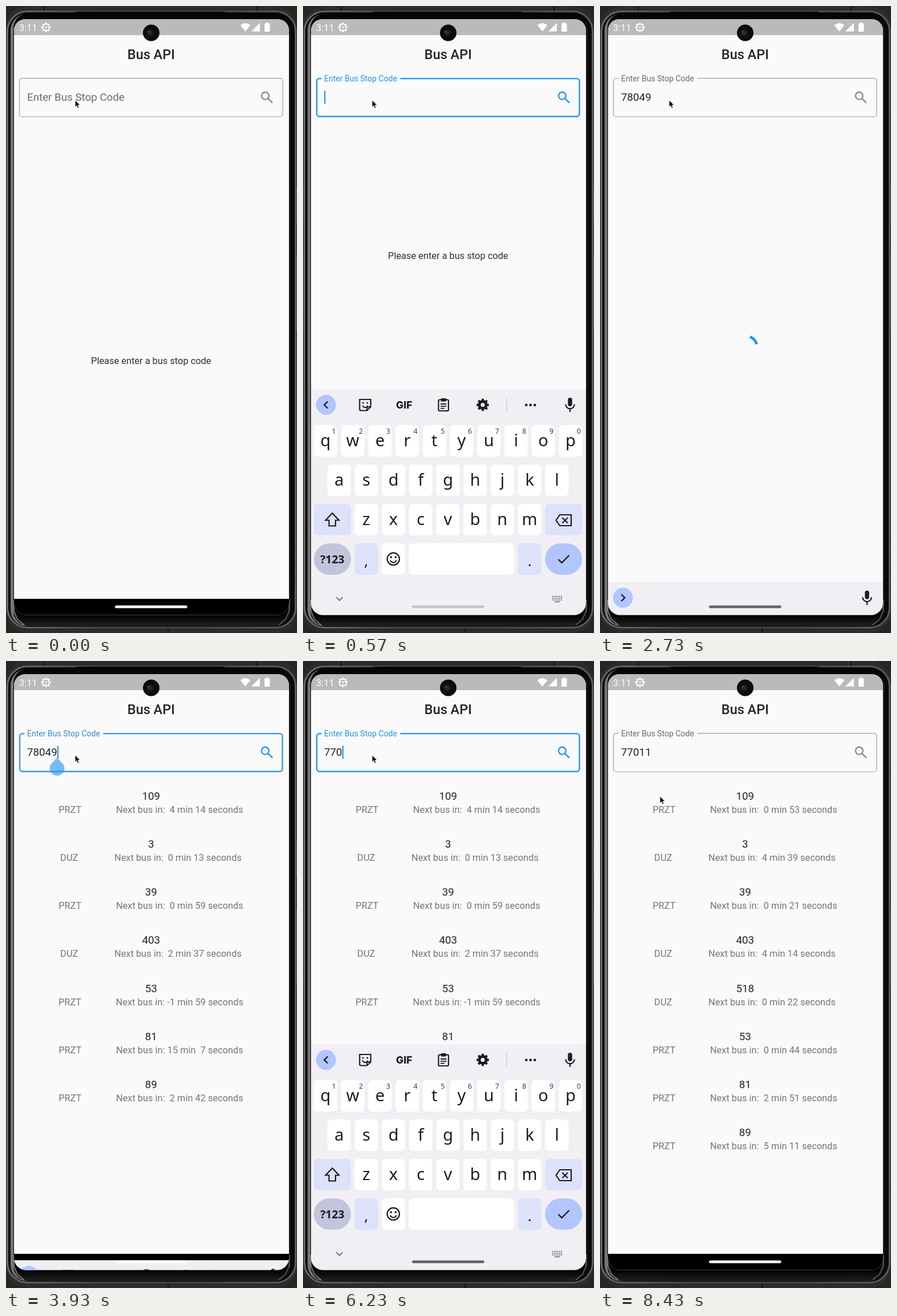
Animation of 510x1098 px, one loop 8.46 s. Source, as an HTML page with a canvas:

```html
<!DOCTYPE html>
<html lang="en">
<head>
<meta charset="utf-8">
<title>Bus API</title>
<style>
html, body { margin: 0; width: 100%; height: 100%; overflow: hidden; background: #1d1d1d; }
canvas { display: block; width: 510px; height: 1098px; }
</style>
</head>
<body>
<canvas id="stage"></canvas>
<script>
const W = 510, H = 1098, LOOP = 8460;
const BLUE = [33, 150, 243], INK = '#242424', GREY = '#757575', PAGE = '#fafafa';
const ACCENT = `rgb(${BLUE})`;
const UI = 'Roboto, sans-serif', KEYS = '"Noto Sans", sans-serif';
const KB_TOP = 671, KB_END = 1066, NAV = 1038.2;
const canvas = document.getElementById('stage');
const dpr = window.devicePixelRatio || 1;
canvas.width = W * dpr;
canvas.height = H * dpr;
const c = canvas.getContext('2d');

const FOCUS = [[270, 2600], [3870, 6730]];
const TYPED = [
  [0, ''], [670, '78'], [770, '780'], [1970, '7804'], [2300, '78049'],
  [4530, '7804'], [4630, '780'], [4900, '78'], [5030, '7'],
  [5870, '77'], [6230, '770'], [6400, '7701'], [6530, '77011']
];
const FIRST = [
  ['109', 'PRZT', 4, 14], ['3', 'DUZ', 0, 13], ['39', 'PRZT', 0, 59], ['403', 'DUZ', 2, 37],
  ['53', 'PRZT', -1, 59], ['81', 'PRZT', 15, 7], ['89', 'PRZT', 2, 42]
];
const SECOND = [
  ['109', 'PRZT', 0, 53], ['3', 'DUZ', 4, 39], ['39', 'PRZT', 0, 21], ['403', 'DUZ', 4, 14],
  ['518', 'DUZ', 0, 22], ['53', 'PRZT', 0, 44], ['81', 'PRZT', 2, 51], ['89', 'PRZT', 5, 11]
];
const MOUSE = [
  [7520, 121, 165], [7570, 140, 110], [7640, 225, 68], [7700, 296, 57],
  [7780, 225, 105], [7860, 85, 205], [7930, 105, 237]
];

const clamp = x => Math.max(0, Math.min(1, x));
const lerp = (a, b, k) => a + (b - a) * k;
const mix = (a, b, k) => `rgb(${a.map((v, i) => Math.round(lerp(v, b[i], k)))})`;

// cubic-bezier(.4, 0, .2, 1)
function ease(x) {
  x = clamp(x);
  let lo = 0, hi = 1, s = x;
  for (let i = 0; i < 18; i++) {
    s = (lo + hi) / 2;
    const r = 1 - s;
    if (1.2 * r * r * s + 0.6 * r * s * s + s * s * s < x) lo = s; else hi = s;
  }
  return s * s * (3 - 2 * s);
}

function text(str, x, y, size, color, align = 'left', weight = 400, family = UI) {
  c.font = `${weight} ${size}px ${family}`;
  c.textAlign = align;
  c.fillStyle = color;
  c.fillText(str, x, y);
}
function widthOf(str, size) {
  c.font = `400 ${size}px ${UI}`;
  return c.measureText(str).width;
}
function round(x, y, w, h, r, fill) {
  c.beginPath();
  c.roundRect(x, y, w, h, r);
  if (fill) { c.fillStyle = fill; c.fill(); }
}
function disc(x, y, r, fill) {
  c.beginPath();
  c.arc(x, y, r, 0, 7);
  c.fillStyle = fill;
  c.fill();
}
function ring(x, y, r, color, width) {
  c.beginPath();
  c.arc(x, y, r, 0, 7);
  stroke(color, width);
}
function stroke(color, width) {
  c.strokeStyle = color;
  c.lineWidth = width;
  c.stroke();
}
function trace(points) {
  c.beginPath();
  for (let i = 0; i < points.length; i += 2) c.lineTo(points[i], points[i + 1]);
}
function line(points, color, width) { trace(points); stroke(color, width); }
function poly(points, fill) { trace(points); c.closePath(); c.fillStyle = fill; c.fill(); }
function gradient(x0, y0, x1, y1, ...colors) {
  const g = c.createLinearGradient(x0, y0, x1, y1);
  colors.forEach((col, i) => g.addColorStop(i / (colors.length - 1), col));
  return g;
}
function gear(x, y, r, color) {
  for (let i = 0; i < 8; i++) {
    const a = i * Math.PI / 4;
    line([x + Math.cos(a) * r * .6, y + Math.sin(a) * r * .6,
      x + Math.cos(a) * r, y + Math.sin(a) * r], color, r * .36);
  }
}

function drawPhone() {
  c.fillStyle = '#262626';
  c.fillRect(0, 0, W, H);
  round(0, 0, W, H, 38, '#2c2c2c');
  round(2.5, 9.5, 505, 1079, 35, '#0a0a0a');
  stroke(gradient(0, 0, W, 0, '#6a6a6a', '#444', '#444', '#5c5c5c'), 3);
  line([67, 0, 67, 9], '#101010', 1.5);
  line([440, 0, 440, 9], '#101010', 1.5);
  line([284, 1090, 284, 1098], '#101010', 1.5);
  // the lit inner edge of the glass
  round(8, 14, 490, 1072, 28, gradient(8, 0, 498, 0, '#777', '#111', '#111', '#2c2c2c'));
  round(13, 13, 484, 1072, 26, '#050505');
  round(122, 10, 262, 4, 2, '#000');
  round(20, 1062, 470, 24, [0, 0, 20, 20], gradient(0, 1066, 0, 1086, '#000', '#202020'));
  line([13, 1040, 14, 1060, 20, 1074, 32, 1084], '#777', 2);
  line([497, 1040, 496, 1060, 490, 1074, 478, 1084], '#555', 2);
  c.fillStyle = '#555';
  c.fillRect(508, 316, 2, 64);
  c.fillRect(508, 436, 2, 132);
}

function drawStatus() {
  c.fillStyle = '#bababa';
  c.fillRect(14, 23, 482, 28);
  text('3:11', 23, 43.5, 16.4, '#fff');
  gear(70, 37.5, 8.3, '#fff');
  ring(70, 37.5, 6, '#fff', 1.7);
  line([70, 37.5, 70, 43], '#fff', 1.2);
  line([64.5, 36.5, 75.5, 36.5], '#fff', 1.2);
  c.beginPath();
  c.moveTo(419.5, 44.5);
  c.lineTo(410.5, 33.5);
  c.quadraticCurveTo(419.5, 26.5, 428.5, 33.5);
  c.closePath();
  c.fillStyle = '#fff';
  c.fill();
  poly([430, 44.5, 445, 44.5, 445, 29.5], '#fff');
  round(453, 30.5, 9.5, 14.5, 1.5, '#fff');
  c.fillRect(455.5, 29, 4.5, 2);
}

function drawCamera() {
  disc(254.5, 47, 14.5, '#0b0b0b');
  const g = c.createRadialGradient(252.5, 47, 1, 252.5, 47, 8);
  g.addColorStop(0, '#3f281c');
  g.addColorStop(1, '#0b0b0b');
  disc(252.5, 47, 8, g);
  disc(250, 45, 1.2, '#6b5348');
}

function drawField(t, s) {
  const float = ease((t - 270) / 200);
  const on = s.focus ? clamp((t - s.focus[0]) / 80) : 0;
  const thick = s.focus ? 2.34 : 1.17;
  const inset = s.focus ? 1.1 : .6;
  round(23 + inset, 126 + inset, 462.6 - 2 * inset, 68.6 - 2 * inset, 4.5);
  stroke(mix([155, 155, 155], BLUE, on), thick);
  c.fillStyle = PAGE;
  c.fillRect(32.5, 124, 138 * float, 6);
  text('Enter Bus Stop Code', 37, lerp(166.3, 131.5, float), lerp(18.75, 14.06, float),
    mix([108, 108, 108], BLUE, on));
  const tint = s.focus ? ACCENT : '#8c8c8c';
  ring(454.3, 157.2, 6.4, tint, 2.4);
  line([458.5, 161.4, 467, 169.6], tint, 2.6);

  text(s.value, 37, 166.3, 18.75, INK);
  const end = 37 + widthOf(s.value, 18.75);
  if (!s.focus) return;
  const since = t - Math.max(s.focus[0], s.typedAt);
  if (Math.floor(since / 500) % 2 === 0) {
    c.fillStyle = ACCENT;
    c.fillRect(end + .2, 148.5, 2.2, 22.5);
  }
  const grip = clamp((t - 3870) / 100) * clamp((4730 - t) / 100);
  if (grip > 0) {
    c.save();
    c.globalAlpha = grip;
    c.translate(end - .2, 188);
    c.rotate(Math.PI / 4);
    round(-12.9, -12.9, 25.8, 25.8, [0, 12.9, 12.9, 12.9], ACCENT);
    c.restore();
  }
}

function drawList(rows) {
  const pad = n => String(n).padStart(2);
  rows.forEach(([bus, operator, min, sec], i) => {
    const y = 242.5 + i * 84.25;
    const wait = `Next bus in: ${pad(min)} min ${pad(sec)} seconds`;
    const w1 = widthOf(operator, 16.4), w2 = widthOf(wait, 16.4);
    const gap = (445 - w1 - w2) / 3;
    text(bus, 254.3, y, 18.75, INK, 'center');
    text(operator, 31.5 + gap, y + 23.2, 16.4, GREY);
    text(wait, 31.5 + 2 * gap + w1, y + 23.2, 16.4, GREY);
  });
}

function drawSpinner(age, y) {
  const turn = Math.max(0, age - 30);
  const phase = (age + 20) / 1333 % 1;
  const head = ease(phase * 2) * 1.5 * Math.PI;
  const tail = ease(phase * 2 - 1) * 1.5 * Math.PI;
  const start = -Math.PI / 2 + tail + turn / 2222 * 2 * Math.PI + turn / 1333 * Math.PI / 2;
  c.beginPath();
  c.arc(254.5, y, 21.1, start, start + Math.max(head - tail, .001));
  stroke(ACCENT, 4.7);
}

function key(x, y, w, fill = '#fff', r = 7) { round(x, y, w, 55, r, fill); }

function drawToolbar(folded) {
  const ink = '#1c1b1f', y = 698.5;
  disc(40.3, y, 17.5, '#b1c5ff');
  const d = folded ? -1 : 1;
  line([40.3 + 3 * d, y - 6, 40.3 - 3 * d, y, 40.3 + 3 * d, y + 6], ink, 2.4);
  round(464.3, 686, 7.4, 15, 3.7, ink);
  c.beginPath();
  c.arc(468, 697.5, 7.7, 0, Math.PI);
  stroke(ink, 2.2);
  line([468, 705, 468, 711], ink, 2.3);
  if (folded) return;

  c.beginPath();
  c.moveTo(112, 708.5);
  c.lineTo(101.5, 708.5);
  c.arcTo(99.3, 708.5, 99.3, 706, 2.5);
  c.lineTo(99.3, 689);
  c.lineTo(118.7, 689);
  c.lineTo(118.7, 702);
  c.closePath();
  stroke(ink, 2.2);
  line([112, 708.5, 112, 702, 118.7, 702], ink, 2);
  disc(105.3, 695, 1.5, ink);
  disc(112.7, 695, 1.5, ink);
  c.beginPath();
  c.arc(109, 698, 5, .35, 2.8);
  stroke(ink, 2);

  text('GIF', 177.3, 705, 17.5, ink, 'center', 800, 'Inter, sans-serif');

  round(237.5, 689.5, 17.5, 19.5, 2);
  stroke(ink, 2.2);
  round(241.5, 687, 9.5, 5.5, 1.5, ink);
  for (let i = 0; i < 3; i++) line([241, 697 + i * 3.8, i < 2 ? 251.5 : 248, 697 + i * 3.8], ink, 1.8);

  gear(315, y, 10.8, ink);
  ring(315, y, 6, ink, 5);

  line([357, 686, 357, 711], '#cac9d0', 1.2);
  for (const x of [391.3, 398.8, 406.3]) disc(x, y + .2, 2.3, ink);
}

function drawKeyboard(top, folded) {
  const ink = '#1c1b1f', pale = '#dde1f9', step = 47.7;
  c.save();
  c.translate(0, top - KB_TOP);
  c.fillStyle = '#f2eff4';
  c.fillRect(14, KB_TOP, 482, 400);
  drawToolbar(folded);
  [['qwertyuiop', 39.5, 734], ['asdfghjkl', 63.3, 803], ['zxcvbnm', 110.8, 872]].forEach(([row, x0, y], n) => {
    [...row].forEach((ch, i) => {
      const x = x0 + i * step;
      key(x - 20.4, y, 40.8);
      text(ch, x, y + 36.8, 29, ink, 'center', 400, KEYS);
      if (n === 0) text((i + 1) % 10, x + 14.5, y + 14.5, 12.5, '#3c3c44', 'center', 500, KEYS);
    });
  });

  key(19, 872, 65, pale);
  trace([51.3, 888, 63, 900.5, 57, 900.5, 57, 910.5, 45.6, 910.5, 45.6, 900.5, 39.6, 900.5]);
  c.closePath();
  stroke(ink, 2.2);
  key(424.2, 872, 65, pale);
  trace([443.5, 900.5, 450, 891, 470, 891, 470, 910, 450, 910]);
  c.closePath();
  stroke(ink, 2.2);
  line([454.5, 896, 464, 905.5], ink, 2.2);
  line([464, 896, 454.5, 905.5], ink, 2.2);

  key(19, 941, 65, '#c1c5dc', 27.5);
  text('?123', 51.3, 976, 19.3, ink, 'center', 600, KEYS);
  key(90.4, 941, 40.8, pale);
  text(',', 110.8, 980.5, 26, ink, 'center', 400, KEYS);
  key(138.1, 941, 40.8);
  ring(158.3, 968.3, 10.7, ink, 2.2);
  disc(154.3, 965.3, 1.8, ink);
  disc(162.3, 965.3, 1.8, ink);
  c.beginPath();
  c.arc(158.3, 969, 5.6, .3, Math.PI - .3);
  stroke(ink, 2.1);
  key(185.5, 941, 184.5);
  key(376.8, 941, 40.8, pale);
  text('.', 397.2, 980.5, 26, ink, 'center', 400, KEYS);
  key(424.2, 941, 65, '#b1c5ff', 27.5);
  line([447.5, 969, 453.5, 975, 466.5, 962], ink, 2.4);

  line([58.5, 1035.5, 64, 1041, 69.5, 1035.5], '#5b5a60', 1.7);
  c.fillStyle = '#6b6a70';
  for (let r = 0; r < 3; r++)
    for (let i = 0; i < 6; i++) c.fillRect(436.5 + i * 3.1, 1033 + r * 3.1, 1.8, 1.8);
  c.fillRect(441, 1042.5, 9, 1.7);
  c.restore();
}

function drawMouse(t) {
  let [, x, y] = MOUSE[0];
  for (let i = 1; i < MOUSE.length; i++) {
    const a = MOUSE[i - 1], b = MOUSE[i];
    if (t < a[0]) break;
    const k = clamp((t - a[0]) / (b[0] - a[0]));
    x = lerp(a[1], b[1], k);
    y = lerp(a[2], b[2], k);
  }
  c.save();
  c.translate(x, y);
  poly([.3, .3, .3, 11.6, 2.9, 9.3, 4.8, 13.7, 6.6, 12.9, 4.8, 8.6, 8.5, 8.4], '#000');
  stroke('rgba(255,255,255,.75)', .6);
  c.restore();
}

function keyboardTop(t) {
  const [up, down] = t < 3500 ? [300, 2616] : [3900, 6746];
  const shown = ease((t - up) / 250) - ease((t - down) / 200);
  return lerp(KB_END, KB_TOP, shown);
}

function draw(t) {
  const [typedAt, value] = TYPED.filter(e => e[0] <= t).pop();
  const state = { typedAt, value, focus: FOCUS.find(f => t >= f[0] && t < f[1]) };
  const top = keyboardTop(t);
  // layout follows the keyboard a moment late
  const middle = 621 - (NAV - Math.min(NAV, keyboardTop(t - 8))) / 2;

  c.setTransform(dpr, 0, 0, dpr, 0, 0);
  drawPhone();
  c.save();
  round(14, 23, 482, 1043.5, [20, 20, 21, 21]);
  c.clip();
  c.fillStyle = PAGE;
  c.fillRect(14, 23, 482, 1044);
  drawStatus();
  text('Bus API', 254.3, 92.5, 23.43, INK, 'center', 500);

  if (t < 2600) text('Please enter a bus stop code', 254.3, middle + 6, 16.4, '#2f2f2f', 'center');
  else if (t < 3430) drawSpinner(t - 2600, middle);
  else if (t < 6730) drawList(FIRST);
  else if (t < 7550) drawSpinner(t - 6730, middle);
  else drawList(SECOND);
  drawField(t, state);

  c.fillStyle = '#000';
  c.fillRect(14, NAV, 482, 30);
  if (top < KB_END - .5) drawKeyboard(top, !state.focus);
  const dark = (t >= 970 && t < 3500) || t >= 5300;
  round(191, 1049.8, 126.7, 4.8, 2.4, top > 1040 ? '#fff' : dark ? '#656367' : '#c6c4c8');
  c.restore();
  drawCamera();
  drawMouse(t);
}

function tick() {
  draw(performance.now() % LOOP);
  requestAnimationFrame(tick);
}
tick();
</script>
</body>
</html>
```
